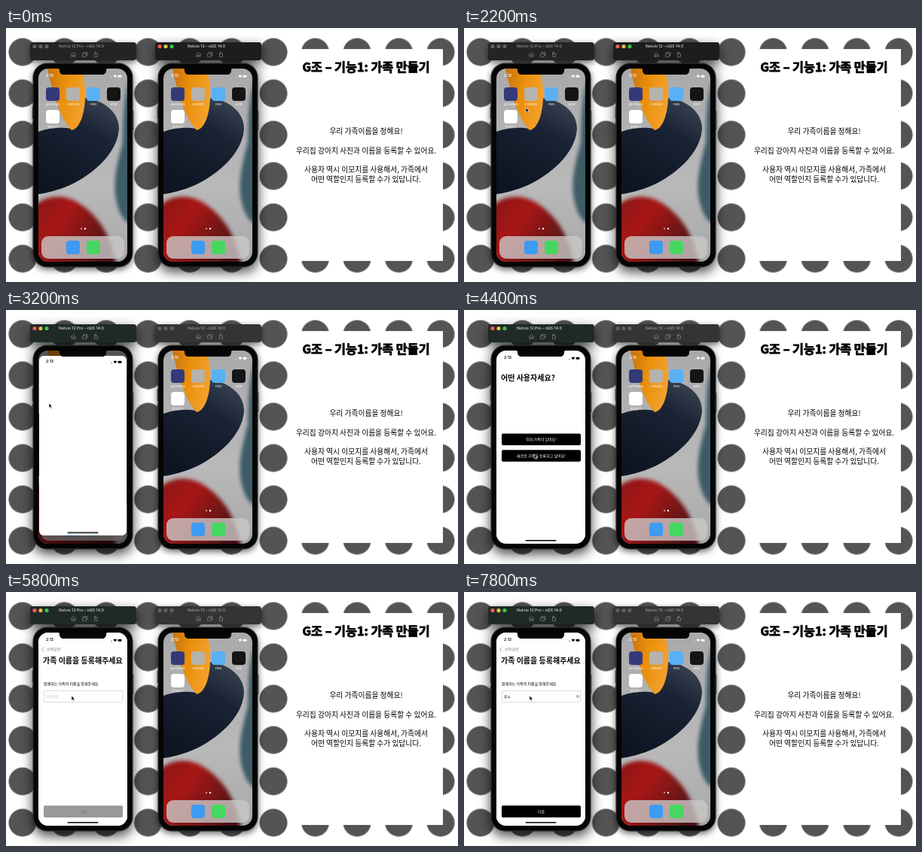
Recreate the animation shown at these times as an HTML page. Size 600x338 px, loop 8 s.

```html
<!DOCTYPE html>
<html>
<head>
<meta charset="utf-8">
<title>가족 만들기</title>
<style>
  html, body { margin: 0; width: 100%; height: 100%; overflow: hidden; background: #fff; }
  svg.stage { display: block; width: 100vw; height: 100vh; }
  text { font-family: "Noto Sans CJK KR", "Noto Sans CJK", sans-serif; }
  .mid { text-anchor: middle; }
  .body { font-size: 9.75px; font-weight: 500; }
  .title { font-size: 16.2px; font-weight: 900; stroke: #000; stroke-width: .8; }
  .heading { font-size: 10px; font-weight: 700; }
  .small { font-size: 5px; }
  .caption { font: 500 3.9px Inter, "Noto Sans CJK KR", sans-serif; fill: #fff; }
  .bar { font: 600 5.2px Inter, sans-serif; }
  .clock { font: 600 5px Inter, sans-serif; }

  /* 8 s loop, 2.5% = one 200 ms step */
  .early, .late, .shade, .dim, .launch, .chrome, .homebar, .first, .second,
  .cursor, .key1, .key2, .empty { animation: 8s step-end infinite; }

  .early { animation-name: early; }
  .late { animation-name: late; }
  @keyframes early { 0% { opacity: 1 } 35%, 100% { opacity: 0 } }
  @keyframes late { 0% { opacity: 0 } 35%, 100% { opacity: 1 } }

  .shade { animation-name: shade-left; }
  .shade.right { animation-name: shade-right; }
  @keyframes shade-left {
    0% { filter: drop-shadow(0 3px 4px #0009) }
    35%, 100% { filter: drop-shadow(0 6px 8px #000b) }
  }
  @keyframes shade-right {
    0% { filter: drop-shadow(0 6px 8px #000b) }
    35%, 100% { filter: drop-shadow(0 3px 4px #0009) }
  }

  .dim { animation-name: dim; }
  @keyframes dim { 0% { opacity: 0 } 37.5% { opacity: .25 } 40%, 100% { opacity: .5 } }
  .launch { animation-name: launch; fill: #fff; }
  @keyframes launch {
    0% { opacity: 0; x: 53px; y: 109px; width: 18px; height: 18px; rx: 4px }
    37.5% { opacity: 1; x: 47px; y: 84px; width: 84px; height: 140px; rx: 9px }
    40% { opacity: 1; x: 44px; y: 61px; width: 116px; height: 239px; rx: 6px }
    42.5%, 100% { opacity: 1; x: 43px; y: 54px; width: 118px; height: 257px; rx: 0 }
  }
  .chrome { animation-name: chrome; }
  @keyframes chrome {
    0% { opacity: 0 }
    40% { opacity: 1; transform: translateY(5px) }
    42.5%, 100% { opacity: 1; transform: none }
  }
  .homebar { animation-name: homebar; }
  @keyframes homebar {
    0% { opacity: 0 }
    40% { opacity: 1; transform: translateY(-10.5px) }
    42.5%, 100% { opacity: 1; transform: none }
  }

  .first { animation-name: first; }
  @keyframes first {
    0% { opacity: 0 }
    45% { opacity: 1; transform: none }
    60% { opacity: 1; transform: translateX(-16px) }
    62.5% { opacity: 1; transform: translateX(-32px) }
    65%, 100% { opacity: 0 }
  }
  .second { animation-name: second; }
  @keyframes second {
    0% { transform: translateX(120px) }
    60% { transform: translateX(62px) }
    62.5% { transform: translateX(8px) }
    65%, 100% { transform: none }
  }

  .key1 { animation-name: key1; }
  .key2 { animation-name: key2; }
  .empty { animation-name: empty; }
  @keyframes key1 { 0% { opacity: 0 } 82.5%, 100% { opacity: 1 } }
  @keyframes key2 { 0% { opacity: 0 } 90%, 100% { opacity: 1 } }
  @keyframes empty { 0% { opacity: 1 } 82.5%, 100% { opacity: 0 } }

  .cursor { animation-name: cursor; }
  @keyframes cursor {
    0% { opacity: 0; transform: translate(128px, 92px) }
    22.5% { opacity: 1; transform: translate(128px, 92px) }
    25% { transform: translate(105px, 98px) }
    27.5% { transform: translate(82px, 106px) }
    30% { transform: translate(66px, 117px) }
    32.5% { transform: translate(57px, 124px) }
    47.5% { transform: translate(62px, 138px) }
    50% { transform: translate(80px, 172px) }
    52.5% { transform: translate(93px, 191.5px) }
    62.5% { transform: translate(91px, 174px) }
    65% { transform: translate(88px, 150px) }
    67.5%, 100% { opacity: 1; transform: translate(87px, 138px) }
  }
</style>
</head>
<body>
<svg class="stage" viewBox="0 0 600 338" preserveAspectRatio="none">
  <defs>
    <pattern id="dots" x="-5.75" y="4.5" width="55.5" height="55" patternUnits="userSpaceOnUse">
      <circle cx="27.75" cy="27.500" r="18.500" fill="#545454"/>
    </pattern>
    <linearGradient id="orange" x2="1" y2=".3">
      <stop stop-color="#c8720f"/><stop offset=".5" stop-color="#e98f0c"/><stop offset="1" stop-color="#f3a02a"/>
    </linearGradient>
    <linearGradient id="navy" x1=".8" y1="0" x2=".3" y2="1">
      <stop stop-color="#384352"/><stop offset=".35" stop-color="#1a2334"/><stop offset="1" stop-color="#0d1422"/>
    </linearGradient>
    <linearGradient id="red" x1="0" y1="0" x2="1" y2=".6">
      <stop stop-color="#86100f"/><stop offset=".4" stop-color="#a81817"/><stop offset="1" stop-color="#4a1113"/>
    </linearGradient>
    <linearGradient id="gray" x2="0" y2="1">
      <stop stop-color="#a9a9aa"/><stop offset=".6" stop-color="#b9b9ba"/><stop offset="1" stop-color="#a8a8a9"/>
    </linearGradient>
    <filter id="haze" x="-20%" y="-20%" width="140%" height="140%"><feGaussianBlur stdDeviation="2.500"/></filter>
    <clipPath id="screen"><rect width="118" height="257" rx="13"/></clipPath>
    <clipPath id="leftScreen"><rect x="43" y="54" width="118" height="257" rx="13"/></clipPath>

    <g id="signal">
      <path d="M99.500 9.500a3.200 3.200 0 0 1 4.800 0l-2.400 2.700z"/>
      <rect x="105.500" y="8.800" width="5" height="2.900" rx=".9"/>
      <circle cx="97" cy="11.300" r=".6"/>
    </g>
    <path id="notch" d="M26 0H92C90 0 90 1 90 2.500C90 6 88 8 84 8H34C30 8 28 6 28 2.500C28 1 28 0 26 0Z" fill="#050505"/>

    <g id="home">
      <g clip-path="url(#screen)">
        <rect width="118" height="257" fill="url(#gray)"/>
        <path d="M124 8C112 34 113 70 112 98C106 122 98 148 103 174C107 194 114 204 124 208Z" fill="#3d5b66" filter="url(#haze)"/>
        <path d="M0 84C16 78 32 78 44 80C54 68 58 50 60 39C90 42 107 60 107 80C105 114 70 142 42 155C26 162 10 166 0 167Z" fill="url(#navy)"/>
        <path d="M12 0C18 28 28 66 44 82C56 80 63 56 62 30C61 14 59 6 56 0Z" fill="url(#orange)"/>
        <path d="M-8 186C8 166 38 166 58 182C80 198 96 220 104 264H-8Z" fill="url(#red)" filter="url(#haze)"/>
      </g>
      <text class="clock" x="10" y="11" fill="#fff">2:13</text>
      <use href="#signal" fill="#fff"/>
      <g>
        <rect x="10" y="25" width="18" height="18" rx="4" fill="#343a78"/>
        <rect x="37" y="25" width="18" height="18" rx="4" fill="#b5b3ad"/>
        <rect x="64" y="25" width="18" height="18" rx="4" fill="#58b0f5"/>
        <rect x="91" y="25" width="18" height="18" rx="4" fill="#151515"/>
        <rect x="10" y="55" width="18" height="18" rx="4" fill="#fff"/>
      </g>
      <g class="caption mid">
        <text x="19" y="48.500">Quickways</text>
        <text x="46" y="48.500">Contacts</text>
        <text x="73" y="48.500">Files</text>
        <text x="100" y="48.500">Wrist</text>
        <text x="19" y="78.500">멍멍일기</text>
      </g>
      <circle cx="57" cy="213" r="1.200" fill="#fff" opacity=".5"/>
      <circle cx="62" cy="213" r="1.200" fill="#fff"/>
      <rect x="4" y="223" width="110" height="30" rx="9" fill="#cbc8c7" opacity=".8"/>
      <rect x="37" y="229" width="18" height="18" rx="4" fill="#3d9bf2"/>
      <rect x="64" y="229" width="18" height="18" rx="4" fill="#45d75f"/>
    </g>

    <g id="lights">
      <circle cx="38" cy="24.500" r="2.600" fill="#fc5b57"/>
      <circle cx="46" cy="24.500" r="2.600" fill="#e5bf3c"/>
      <circle cx="54" cy="24.500" r="2.600" fill="#34c648"/>
    </g>
    <g id="offLights" fill="#606060">
      <circle cx="38" cy="24.500" r="2.600"/><circle cx="46" cy="24.500" r="2.600"/><circle cx="54" cy="24.500" r="2.600"/>
    </g>
    <g id="tools" fill="none" stroke="#858585" stroke-width=".7">
      <path d="M86 35.500L89.500 32.300L93 35.500M87 35V38.300H88.600V36H90.400V38.300H92V35"/>
      <path d="M101.500 34.200H106.500V38.200H101.500ZM103 34V32.500H108V36.500H106.800"/>
      <path d="M117.500 34.200H121.500V38.300H117.500ZM117.500 34V32.800H119.800M118.600 31.700L119.800 32.800L118.600 33.900"/>
    </g>
    <rect id="barShape" x="32" y="19" width="141" height="24" rx="4"/>
    <g id="case">
      <rect x="35.500" y="46.500" width="133" height="272" rx="19" fill="#292b2c"/>
      <rect x="36.700" y="47.700" width="130.600" height="269.600" rx="18" fill="#050505"/>
      <path d="M35.300 88V97M35.300 105V121M35.300 125V141M168.700 110V136" stroke="#303234" stroke-width="1.200"/>
    </g>
  </defs>

  <rect width="600" height="338" fill="#fff"/>
  <rect width="600" height="338" fill="url(#dots)"/>
  <rect x="377" y="28" width="203" height="282" fill="#fff"/>
  <text class="title mid" x="478" y="58">G조 – 기능1: 가족 만들기</text>
  <g class="body mid">
    <text x="478" y="141">우리 가족이름을 정해요!</text>
    <text x="478" y="166.500">우리집 강아지 사진과 이름을 등록할 수 있어요.</text>
    <text x="478" y="191.500">사용자 역시 이모지를 사용해서, 가족에서</text>
    <text x="478" y="204.500">어떤 역할인지 등록할 수가 있답니다.</text>
  </g>

  <!-- left device -->
  <g class="shade">
    <use href="#case"/>
    <use href="#barShape" fill="#232525"/>
    <use href="#barShape" fill="#1f2a27" class="late"/>
  </g>
  <g class="early"><use href="#offLights"/><text class="bar" x="70" y="26.400" fill="#858585">Nelvio 12 Pro – nQS 14.0</text></g>
  <g class="late"><use href="#lights"/><text class="bar" x="70" y="26.400" fill="#c4c8c6">Nelvio 12 Pro – nQS 14.0</text></g>
  <use href="#tools"/>
  <use href="#home" x="43" y="54"/>

  <g clip-path="url(#leftScreen)">
    <rect class="dim" x="43" y="54" width="118" height="257"/>
    <rect class="launch"/>
    <g class="first">
      <text class="heading" x="49" y="94">어떤 사용자세요?</text>
      <rect x="50" y="164.500" width="105" height="15.500" rx="2"/>
      <rect x="50" y="186.300" width="105" height="15.500" rx="2"/>
      <g class="small mid" fill="#fff">
        <text x="102.500" y="174">이미 가족이 있어요!</text>
        <text x="102.500" y="195.800">새로운 가족을 등록하고 싶어요!</text>
      </g>
    </g>
    <g class="second">
      <rect x="43" y="54" width="118" height="257" fill="#fff"/>
      <path d="M50.300 73.500L47.500 76.500L50.300 79.500" fill="none" stroke="#888" stroke-width=".8"/>
      <text class="small" x="54" y="78.300" fill="#888">선택화면</text>
      <text class="heading" x="49" y="94.500">가족 이름을 등록해주세요</text>
      <text class="small" x="50" y="123.800" font-weight="500">함께하는 가족의 이름을 정해주세요.</text>
      <rect x="50.300" y="131.300" width="104.400" height="15.400" rx="1.500" fill="#fff" stroke="#c9c9c9" stroke-width=".7"/>
      <text class="empty" x="53" y="140.700" font-size="4.400" fill="#c4c4c4">가족이름</text>
      <g font-size="4.600">
        <text class="key1" x="53" y="140.700">루</text>
        <text class="key2" x="57.200" y="140.700">시</text>
      </g>
      <g class="key1">
        <circle cx="151" cy="139" r="2" fill="#a5a5a5"/>
        <path d="M150.200 138.200L151.800 139.800M151.800 138.200L150.200 139.800" stroke="#fff" stroke-width=".5"/>
      </g>
      <rect x="50" y="284.300" width="105" height="15.700" rx="2" fill="#999"/>
      <rect class="key1" x="50" y="284.300" width="105" height="15.700" rx="2"/>
      <text class="small mid empty" x="102.500" y="294" fill="#777">다음</text>
      <text class="small mid key1" x="102.500" y="294" fill="#fff">다음</text>
    </g>
    <g class="chrome">
      <text class="clock" x="53" y="65">2:13</text>
      <use href="#signal" x="43" y="54"/>
    </g>
    <rect class="homebar" x="81.500" y="306" width="41" height="1.500" rx=".75"/>
  </g>
  <use href="#notch" x="43" y="54"/>

  <!-- right device -->
  <g transform="translate(166)">
    <g class="shade right">
      <use href="#case"/>
      <use href="#barShape" fill="#343434"/>
      <use href="#barShape" fill="#1c1e1e" class="early"/>
    </g>
    <g class="early"><use href="#lights"/><text class="bar" x="75" y="26.400" fill="#c4c4c4">Nelvio 12 – nQS 14.0</text></g>
    <g class="late"><use href="#offLights"/><text class="bar" x="75" y="26.400" fill="#909090">Nelvio 12 – nQS 14.0</text></g>
    <use href="#tools"/>
    <use href="#home" x="43" y="54"/>
    <use href="#notch" x="43" y="54"/>
  </g>

  <path class="cursor" d="M0 0V6.200L1.500 4.900L2.500 7.200L3.600 6.700L2.600 4.500H4.500Z" stroke="#fff" stroke-width=".6"/>
</svg>
</body>
</html>
```
